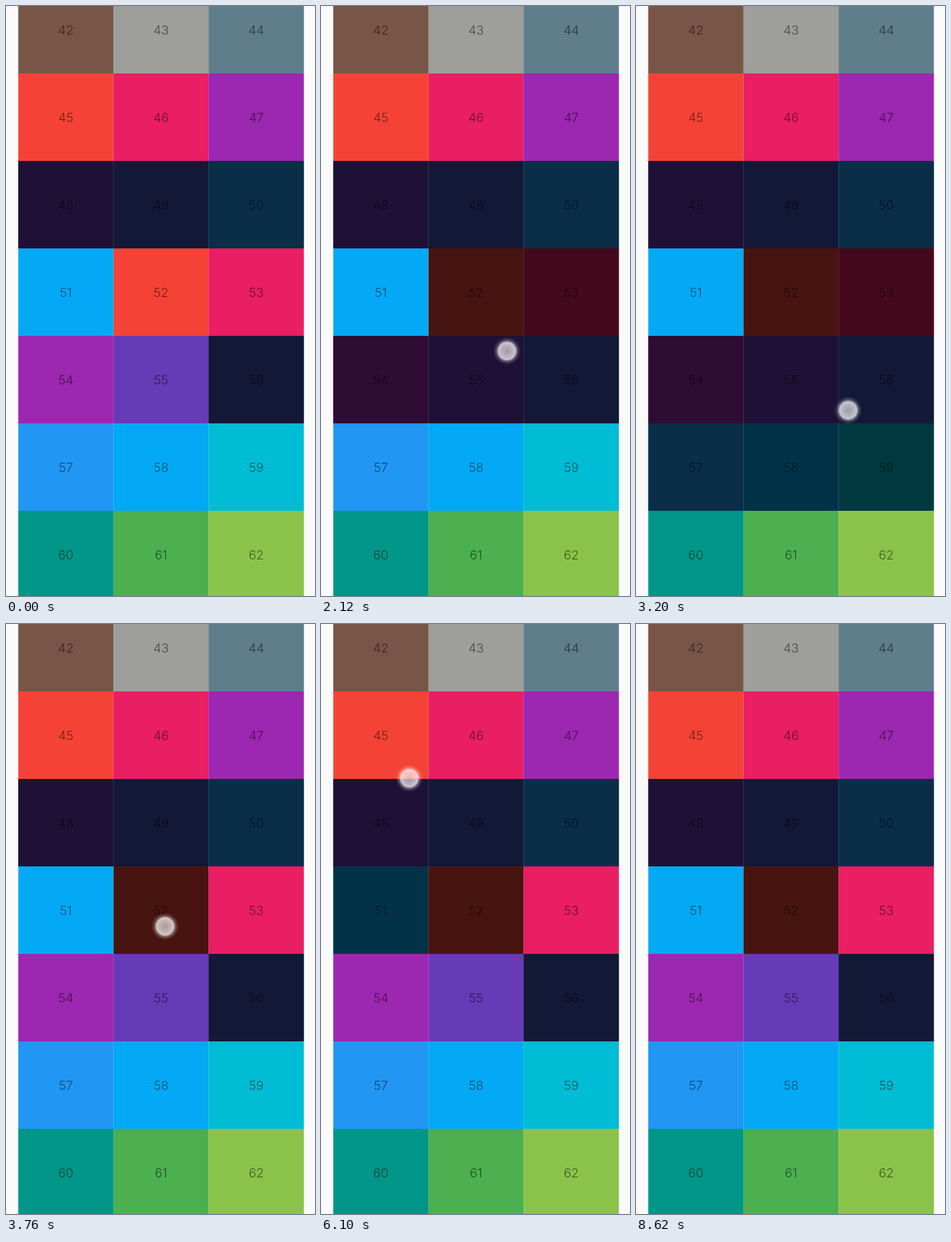
These frames come from a looping animation (542x1032 px, 8720 ms). An HTML page:

```html
<!DOCTYPE html>
<html lang="en">
<head>
<meta charset="utf-8">
<title>Drag selection grid</title>
<style>
  html, body { margin: 0; width: 100%; height: 100%; overflow: hidden; background: #fafafa; }
  svg { display: block; width: 100%; height: 100%; }
  text { font: 300 22px Inter, Roboto, sans-serif; text-anchor: middle; fill: #000; fill-opacity: .54; }
</style>
</head>
<body>
<svg id="stage" viewBox="0 0 542 1032" preserveAspectRatio="none">
  <defs>
    <radialGradient id="glow">
      <stop offset="0" stop-color="#fff" stop-opacity=".57"/>
      <stop offset=".35" stop-color="#fff" stop-opacity=".66"/>
      <stop offset=".64" stop-color="#fff" stop-opacity=".76"/>
      <stop offset=".68" stop-color="#fff" stop-opacity=".48"/>
      <stop offset=".82" stop-color="#fff" stop-opacity=".17"/>
      <stop offset="1" stop-color="#fff" stop-opacity="0"/>
    </radialGradient>
  </defs>
  <g id="grid"></g>
  <circle id="touch" r="24" fill="url(#glow)"/>
</svg>
<script>
const LOOP = 8720;
const FIRST = 42, LAST = 62, ANCHOR = 52;
const PRESS = 950, LAG = 80;
const ROW = 153, TOP = -35;
const COLUMNS = [21.5, 188.7, 355.3, 522.5];
const PRESELECTED = new Set([48, 49, 50, 56]);
const PALETTE = ['#f44336', '#e91e63', '#9c27b0', '#673ab7', '#3f51b5', '#2196f3', '#03a9f4',
                 '#00bcd4', '#009688', '#4caf50', '#8bc34a'];
const NEUTRALS = ['#795548', '#9e9e9b', '#607d8b'];

// Finger path: time, x, y
const PATH = [
  [1500, 281, 499], [2040, 316, 582], [2730, 431, 815], [2860, 431, 822],
  [3300, 352, 668], [3760, 279, 529], [4150, 280, 508], [5400, 280, 505],
  [6100, 155, 270], [6300, 150, 246], [6560, 150, 244],
  [7180, 248, 433], [7600, 279, 497]
];

const svg = (name, attrs, parent) => {
  const node = document.createElementNS('http://www.w3.org/2000/svg', name);
  for (const key in attrs) node.setAttribute(key, attrs[key]);
  return parent.appendChild(node);
};
const clamp = v => Math.max(0, Math.min(1, v));

function colorOf(n) {
  if (n < 45) return NEUTRALS[n - FIRST];
  return PALETTE[n < ANCHOR ? n - 45 : n - ANCHOR];
}

const grid = document.getElementById('grid');
const touch = document.getElementById('touch');
const cells = [];
for (let n = FIRST; n <= LAST; n++) {
  const col = (n - FIRST) % 3, y = TOP + ROW * Math.floor((n - FIRST) / 3);
  const x = COLUMNS[col], box = { x, y, width: COLUMNS[col + 1] - x, height: ROW };
  svg('rect', { ...box, fill: colorOf(n) }, grid);
  const shade = svg('rect', { ...box, fill: '#000', 'fill-opacity': .7 }, grid);
  svg('text', { x: 105 + col * 167, y: y + 84.5 }, grid).textContent = n;
  cells.push({ n, shade });
}

// Slope at a path point; zero where the finger turns or rests.
function slope(i, axis) {
  if (i === 0 || i === PATH.length - 1) return 0;
  const [a, b, c] = [PATH[i - 1], PATH[i], PATH[i + 1]];
  const before = (b[axis] - a[axis]) / (b[0] - a[0]);
  const after = (c[axis] - b[axis]) / (c[0] - b[0]);
  return before * after <= 0 ? 0 : 2 * before * after / (before + after);
}

function fingerAt(t) {
  const end = PATH.length - 1;
  if (t <= PATH[0][0]) return PATH[0].slice(1);
  if (t >= PATH[end][0]) return PATH[end].slice(1);
  const i = PATH.findIndex(p => p[0] > t) - 1;
  const a = PATH[i], b = PATH[i + 1], span = b[0] - a[0], u = (t - a[0]) / span;
  return [1, 2].map(k =>
    a[k] * (1 + 2 * u) * (1 - u) ** 2 + b[k] * u * u * (3 - 2 * u) +
    span * (slope(i, k) * u * (1 - u) ** 2 - slope(i + 1, k) * u * u * (1 - u)));
}

function cellAt([x, y]) {
  const col = x < COLUMNS[1] ? 0 : x < COLUMNS[2] ? 1 : 2;
  return FIRST + 3 * Math.floor((y - TOP) / ROW) + col;
}

function render(t) {
  const current = cellAt(fingerAt(t - LAG));
  const low = Math.min(ANCHOR, current), high = Math.max(ANCHOR, current);
  for (const { n, shade } of cells) {
    const dragged = t >= PRESS && n >= low && n <= high;
    shade.setAttribute('visibility', dragged || PRESELECTED.has(n) ? 'visible' : 'hidden');
  }
  const [x, y] = fingerAt(t);
  touch.setAttribute('cx', x);
  touch.setAttribute('cy', y);
  touch.setAttribute('opacity', Math.min(clamp((t - 350) / 200), clamp((8420 - t) / 220)));
}

const start = performance.now();
function tick() {
  render((performance.now() - start) % LOOP);
  requestAnimationFrame(tick);
}
tick();
</script>
</body>
</html>
```
